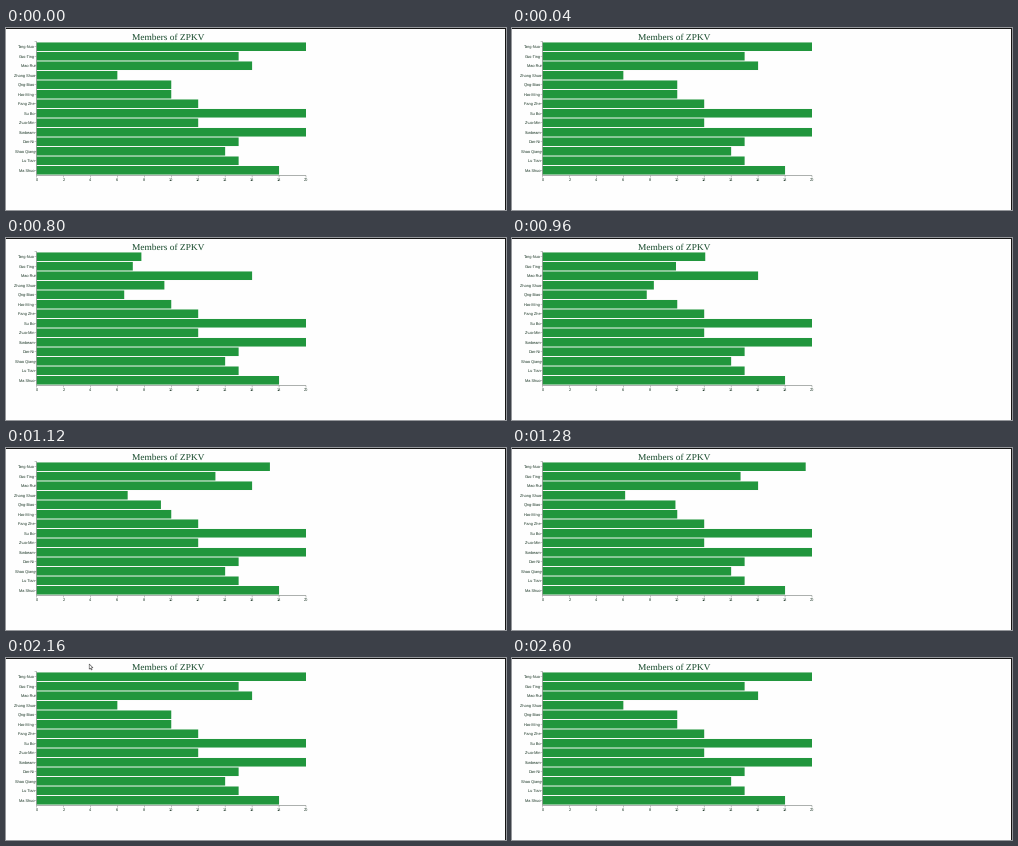
A matplotlib script for the animation above (3.84 s loop, 500 by 182 pixels).

```python
import matplotlib.pyplot as plt
from matplotlib.animation import FuncAnimation
from matplotlib.patches import Polygon, Rectangle

W, H, DPI = 500, 182, 100
STEP_MS, FRAMES = 40, 96
LEFT, RIGHT, TOP, BOTTOM = 30.5, 300, 13.5, 147.5
UNIT = (RIGHT - LEFT) / 20
GREEN, INK, AXIS = "#21963d", "#173322", "#8a8f8c"

# name, starting value, final value
MEMBERS = [
    ("Tang-Nuo", 6, 20), ("Guo-Ting", 6, 15), ("Mao Rui", 16, 16),
    ("Zhong Shuo", 10, 6), ("Qing-Biao", 6, 10), ("Hao-Ming", 10, 10),
    ("Fang Zhe", 12, 12), ("Su Bo", 20, 20), ("Zhuo-Min", 12, 12),
    ("Sunbeam", 20, 20), ("Dan-Ni", 15, 15), ("Shao Qiang", 14, 14),
    ("Lu Tian", 15, 15), ("Ma Shuo", 18, 18),
]
BAND = (BOTTOM - TOP) / (len(MEMBERS) + 0.1)

JUMP_MS, GROW_START, GROW_MS = 560, 483, 1000
POINTER_IN, POINTER_OUT = 2160, 2400
ARROW = [(0, 0), (0, 5.2), (1.2, 4.1), (2.1, 6), (2.9, 5.6), (2.1, 3.8), (3.8, 3.8)]

plt.rcParams["text.hinting"] = "none"
fig = plt.figure(figsize=(W / DPI, H / DPI), dpi=DPI, facecolor="#fefefe")
ax = fig.add_axes([0, 0, 1, 1])
ax.set_xlim(0, W)
ax.set_ylim(H, 0)
ax.axis("off")


def box(x, y, w, h, color, **kw):
    return ax.add_patch(Rectangle((x, y), w, h, fc=color, lw=0, snap=False, **kw))


def label(x, y, text, px, ha="center", va="center_baseline", color=INK,
          font="Liberation Sans"):
    ax.text(x, y, text, fontsize=px * 72 / DPI, family=font, color=color,
            ha=ha, va=va)


def ease(t):
    t = min(max(t, 0), 1)
    return 4 * t ** 3 if t < 0.5 else 1 - 4 * (1 - t) ** 3


# window edges
box(0, 0, W, 1, "#151515")
box(W - 1, 0, 1, H, "#151515")

label(162.5, 11.6, "Members of ZPKV", 9.4, va="baseline", color="#15492a",
      font="Liberation Serif")

bars = []
for i, (name, first, last) in enumerate(MEMBERS):
    y = TOP + BAND * (i + 0.1)
    bars.append(box(LEFT, y, last * UNIT, BAND * 0.9, GREEN))
    mid = y + BAND * 0.45
    box(28.6, mid - 0.25, 2, 0.5, AXIS)
    label(29, mid, name, 3.9, ha="right")

box(LEFT - 0.4, TOP, 0.7, BOTTOM - TOP, AXIS, zorder=2)
box(LEFT, BOTTOM - 0.3, RIGHT - LEFT, 0.7, AXIS, zorder=2)
box(28.6, TOP - 0.25, 2, 0.5, AXIS)
for v in range(0, 21, 2):
    x = LEFT + v * UNIT
    box(x - 0.25, BOTTOM, 0.5, 2, AXIS)
    label(x, 151.2, str(v), 3.9)

pointer = ax.add_patch(Polygon(ARROW, closed=True, fc="white", ec="#555555",
                               lw=0.45, zorder=5))


def update(n):
    t = n * STEP_MS
    k = 1 if t < JUMP_MS else ease((t - GROW_START) / GROW_MS)
    for bar, (_, first, last) in zip(bars, MEMBERS):
        bar.set_width((first + (last - first) * k) * UNIT)

    pointer.set_visible(POINTER_IN <= t < POINTER_OUT)
    p = (t - POINTER_IN) / (POINTER_OUT - POINTER_IN)
    rise = 13 * p * p
    pointer.set_xy([(83.2 + x, 6 + y - rise) for x, y in ARROW])
    return bars + [pointer]


anim = FuncAnimation(fig, update, frames=FRAMES, interval=STEP_MS,
                     init_func=lambda: update(0), repeat=True, repeat_delay=0)
plt.show()
```
